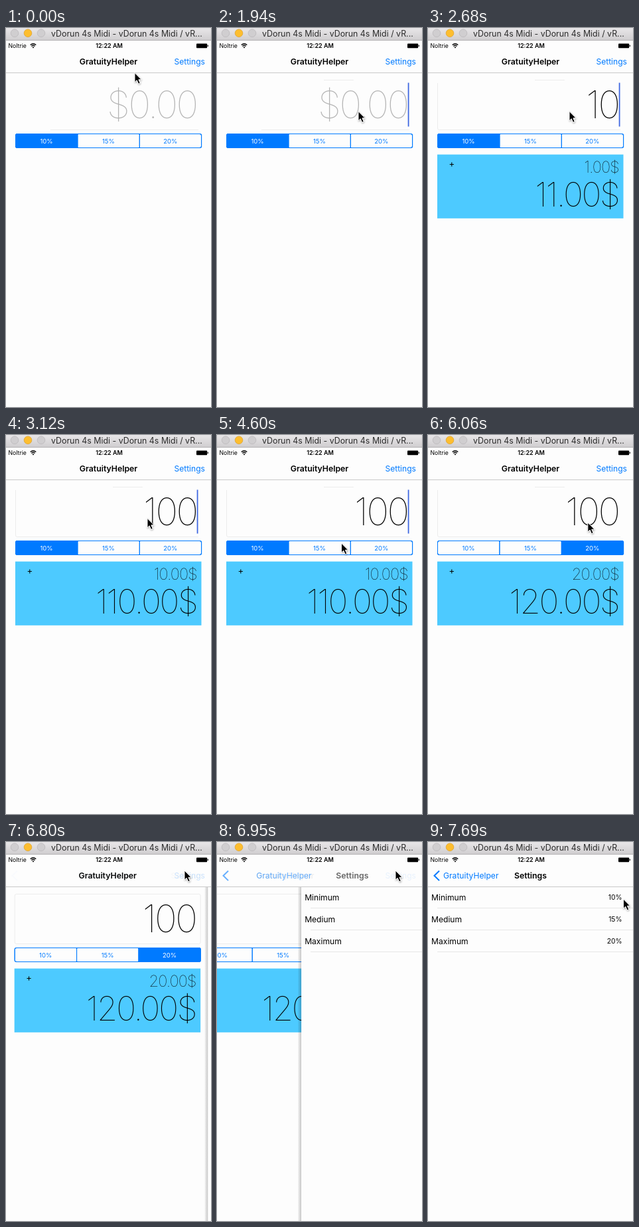
These frames come from a looping animation (309x571 px, 8000 ms). An HTML page:

```html
<!DOCTYPE html>
<html lang="en">
<head>
<meta charset="utf-8">
<title>Tip calculator demo</title>
<style>
  html, body { margin: 0; width: 100%; height: 100%; overflow: hidden; background: #fdfdfd; }
  svg { display: block; width: 309px; height: 571px; }
  text { font-family: Inter, Roboto, "Open Sans", sans-serif; font-size: 12.1px; }
  .bold { font-weight: 600; font-size: 12.3px; }
  .mid { text-anchor: middle; }
  .end { text-anchor: end; }
  .blue { fill: #007aff; }
  .seg { font-size: 9.5px; }
  .num { text-anchor: end; font-weight: 100; letter-spacing: -0.045em; }
  .value { font-size: 10.3px; }
</style>
</head>
<body>
<svg viewBox="0 0 309 571">
  <defs>
    <linearGradient id="chrome" x2="0" y2="1">
      <stop stop-color="#e8e6e8"/><stop offset="1" stop-color="#d0ced0"/>
    </linearGradient>
    <linearGradient id="edge">
      <stop stop-color="#000" stop-opacity=".04"/><stop offset="1" stop-color="#000" stop-opacity=".22"/>
    </linearGradient>
    <clipPath id="body"><rect y="68" width="309" height="503"/></clipPath>
    <filter id="soft" x="-50%" y="-50%" width="200%" height="200%">
      <feDropShadow dx="0.5" dy="1.2" stdDeviation="0.9" flood-opacity=".35"/>
    </filter>
  </defs>
  <rect width="309" height="571" fill="#fdfdfd"/>

  <g clip-path="url(#body)">
    <g id="home">
      <path id="frame" fill="none" stroke="#ececec"/>
      <text id="bill" class="num" x="287.7" y="136.2" style="font-size:57px"></text>
      <rect id="caret" x="287.7" y="82.5" width="1.8" height="66" fill="#4169e1"/>
      <g id="segments"></g>
      <rect x="14.5" y="159.5" width="280" height="21" rx="3" fill="none" stroke="#007aff"/>
      <g id="panel">
        <rect x="14" y="190.6" width="280.5" height="96.2" fill="#4dcaff"/>
        <text class="mid" x="35.8" y="209" style="font-size:13px">+</text>
        <text id="tip" class="num" x="287.7" y="218" style="font-size:24px"></text>
        <text id="total" class="num" x="287.7" y="269" style="font-size:50.5px"></text>
      </g>
    </g>
    <g id="page">
      <rect x="-5" y="68" width="5" height="503" fill="url(#edge)"/>
      <rect y="68" width="309" height="503" fill="#fdfdfd"/>
      <g id="rows"></g>
    </g>
  </g>

  <path d="M0 67.5H309" stroke="#cacaca"/>
  <text id="title" class="bold mid" x="154.5" y="55">GratuityHelper</text>
  <text id="open" class="blue end" x="300" y="55">Settings</text>
  <g id="back">
    <path d="M17 43.5L9.5 50.8L17 58.1" fill="none" stroke="#007aff" stroke-width="2"/>
    <text id="backLabel" class="blue" x="23" y="55">GratuityHelper</text>
  </g>
  <text id="pageTitle" class="bold mid" x="154.5" y="55">Settings</text>

  <text x="3.5" y="30" style="font-size:8.7px">Noltrie</text>
  <path d="M36.7 25.6Q41 21.7 45.3 25.6M38.4 27.5Q41 25.1 43.6 27.5" fill="none" stroke="#000" stroke-width="1.4"/>
  <path d="M39.6 28.9Q41 27.8 42.4 28.9L41 30.5Z"/>
  <text class="mid" x="155.5" y="30" style="font-size:9px;font-weight:600">12:22 AM</text>
  <rect x="287" y="23.4" width="16.2" height="6.8" rx="1"/>
  <rect x="303.7" y="25.5" width="1.2" height="2.6" rx=".6"/>

  <rect width="309" height="18" fill="url(#chrome)"/>
  <path d="M0 18.5H309" stroke="#b4b2b4"/>
  <g stroke-width=".8" fill="#d0ced0" stroke="#bab8ba">
    <circle cx="13" cy="7.7" r="5.8"/>
    <circle cx="33" cy="7.7" r="5.8" fill="#fdbe2f" stroke="#dfa32c"/>
    <circle cx="53" cy="7.7" r="5.8"/>
  </g>
  <text x="68" y="12.6" fill="#2c2c2c" style="font-size:12.4px">vDorun 4s Midi - vDorun 4s Midi / vR...</text>

  <path id="cursor" d="M0 0V14.2L3.2 11.2L5.7 16.8L8.3 15.7L5.9 10.3H10.2Z" stroke="#fff" filter="url(#soft)"/>
</svg>
<script>
const LOOP = 8000, STEP = 147.6, OFFSET = 5;

// Moments of the story, counted in steps.
const FOCUS = 13, TYPE = 17, BLINK = 25, MEDIUM = 33, MAXIMUM = 40, PRESS = 45, PUSH = 45.9;

// The pointer's stops: leave, arrive, x, y.
const START = [194, 67.5];
const STOPS = [
  [2, 5, 111, 182], [5, 7, 167, 165], [8, 11, 213, 125.5], [24, 30, 187.5, 163],
  [34, 38, 231, 163], [40, 43, 269, 43], [49, 52, 294.5, 86]
];

const OPTIONS = [["Minimum", 10], ["Medium", 15], ["Maximum", 20]];
const SEG = 93.4;

const $ = id => document.getElementById(id);
const clamp = v => Math.max(0, Math.min(1, v));
const smooth = v => v * v * (3 - 2 * v);
const fade = (id, v) => $(id).setAttribute("opacity", clamp(v));
const move = (id, x, y = 0) => $(id).setAttribute("transform", `translate(${x} ${y})`);
const money = v => v.toFixed(2) + "$";

$("segments").innerHTML = OPTIONS.map(([, rate], i) =>
  `<rect x="${14.5 + i * SEG}" y="159.5" width="${SEG}" height="21" rx="1.5" stroke="#007aff"/>
   <text class="seg mid" x="${61 + i * SEG}" y="173.5">${rate}%</text>`).join("");
$("rows").innerHTML = OPTIONS.map(([name, rate], i) =>
  `<g transform="translate(0 ${i * 33})">
     <text x="5" y="88">${name}</text>
     <text class="value end" x="292.5" y="87">${rate}%</text>
     <path d="M14 99.5H309" stroke="#e6e6e6"/>
   </g>`).join("");
const tabs = $("segments").querySelectorAll("rect");
const labels = $("segments").querySelectorAll("text");

function pointer(step) {
  let [x, y] = START;
  for (const [leave, arrive, toX, toY] of STOPS) {
    const p = smooth(clamp((step - leave) / (arrive - leave)));
    x += (toX - x) * p;
    y += (toY - y) * p;
  }
  return [x, y];
}

function caret(step) {
  if (step < FOCUS || step >= PRESS) return 0;
  return step < BLINK ? 1 : .5 + .9 * Math.cos((step - 29.9) * 2 * Math.PI / 7);
}

// Critically damped spring from 0 to 1.
function spring(step) {
  const s = 1.8 * Math.max(0, step - PUSH);
  return 1 - (1 + s) * Math.exp(-s);
}

// The field's outline shows up side by side.
function outline(step) {
  if (step >= PRESS) return "M17 78.5H292Q294.5 78.5 294.5 81V151Q294.5 153.5 292 153.5H17Q14.5 153.5 14.5 151V81Q14.5 78.5 17 78.5Z";
  return "M67 153.5H290" + (step > 2 ? "M161 78.5H206" : "") + (step >= TYPE ? "M14.5 83V151Q14.5 153.5 17 153.5H67" : "");
}

function render(t) {
  const step = Math.floor(Math.max(0, t - OFFSET) / STEP);
  const bill = step < TYPE ? 0 : 10 ** Math.min(2, Math.floor((step - TYPE + 1) / 2));
  const choice = (step >= MEDIUM) + (step >= MAXIMUM);
  const rate = OPTIONS[choice][1];

  move("cursor", ...pointer(step));
  fade("caret", caret(step));
  fade("panel", (step - TYPE + 1) / 2);
  $("frame").setAttribute("d", outline(step));

  $("bill").textContent = bill || "$0.00";
  $("bill").setAttribute("fill", bill ? "#000" : "#b4b4b4");
  $("tip").textContent = money(bill * rate / 100);
  $("total").textContent = money(bill * (1 + rate / 100));
  tabs.forEach((tab, i) => {
    tab.setAttribute("fill", i === choice ? "#007aff" : "none");
    labels[i].setAttribute("fill", i === choice ? "#fff" : "#007aff");
  });

  // The next page slides over the first, which drifts left more slowly.
  const push = spring(step), rest = 1 - push;
  move("home", -93 * push);
  move("page", 309 * rest);
  fade("page", push > 0 ? 1 : 0);
  move("title", -88 * push);
  fade("title", 1 - 1.6 * push);
  fade("open", step < PRESS ? 1 : .2 * rest);
  move("backLabel", 88 * rest);
  fade("back", push);
  move("pageTitle", 120 * rest);
  fade("pageTitle", push);
}

function tick() {
  render(performance.now() % LOOP);
  requestAnimationFrame(tick);
}
tick();
</script>
</body>
</html>
```
